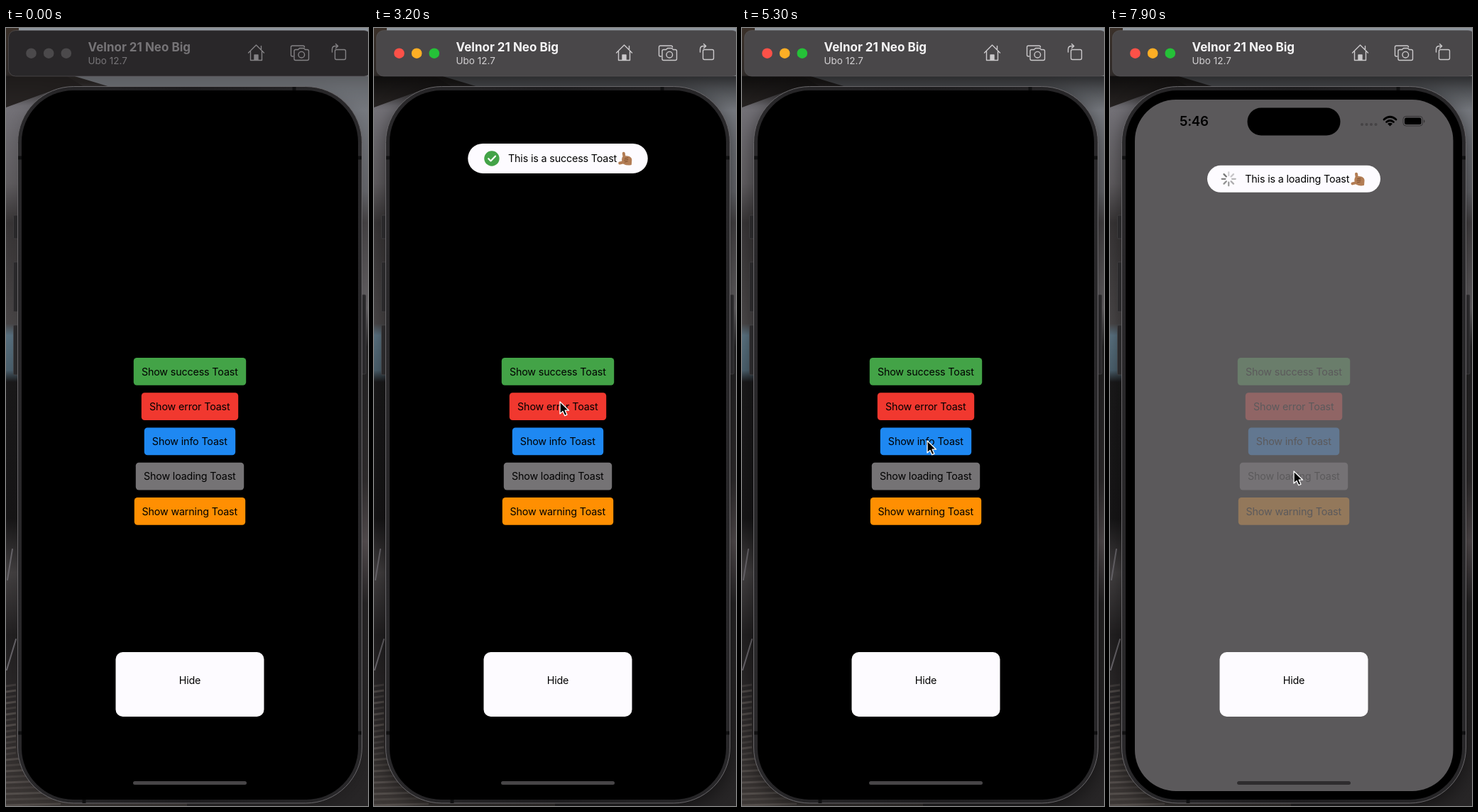
Recreate the animation shown at these times as an HTML page. Size 510 by 1097 pixels, loop 8 s.

```html
<!DOCTYPE html>
<html lang="en">
<head>
<meta charset="utf-8">
<title>Toast demo</title>
<style>
  html, body { margin: 0; width: 100%; height: 100%; overflow: hidden; background: #000; }
  svg { display: block; width: 510px; height: 1097px; }
  text { font-family: Inter, "Liberation Sans", sans-serif; }
  .label { font-size: 14.3px; letter-spacing: -.15px; }
  .mid { text-anchor: middle; }
  .line { fill: none; stroke-linecap: round; stroke-linejoin: round; }
</style>
</head>
<body>
<svg viewBox="0 0 510 1097">
  <defs>
    <linearGradient id="leftTone" x2="0" y2="1">
      <stop offset="0" stop-color="#3a3029"/><stop offset=".07" stop-color="#2e2a29"/>
      <stop offset=".1" stop-color="#747278"/><stop offset=".2" stop-color="#625f62"/>
      <stop offset=".25" stop-color="#3a3738"/><stop offset=".38" stop-color="#4b4849"/>
      <stop offset=".395" stop-color="#5b7382"/><stop offset=".44" stop-color="#4d626f"/>
      <stop offset=".455" stop-color="#1b1a1b"/><stop offset=".63" stop-color="#171617"/>
      <stop offset=".7" stop-color="#454243"/><stop offset=".78" stop-color="#232122"/>
      <stop offset=".86" stop-color="#2c292a"/><stop offset="1" stop-color="#3d3836"/>
    </linearGradient>
    <linearGradient id="rightTone" x2="0" y2="1">
      <stop offset="0" stop-color="#9299a1"/><stop offset=".1" stop-color="#777a80"/>
      <stop offset=".21" stop-color="#68696e"/><stop offset=".25" stop-color="#484547"/>
      <stop offset=".36" stop-color="#6a676a"/><stop offset=".41" stop-color="#242324"/>
      <stop offset=".58" stop-color="#302d2e"/><stop offset=".66" stop-color="#564f51"/>
      <stop offset=".74" stop-color="#272526"/><stop offset="1" stop-color="#282627"/>
    </linearGradient>
    <linearGradient id="shade" x2="0" y2="1">
      <stop offset="0" stop-opacity=".65"/><stop offset="1" stop-opacity="0"/>
    </linearGradient>
    <linearGradient id="rim" x2="1">
      <stop offset="0" stop-color="#29282a"/><stop offset=".5" stop-color="#1d1c1e"/><stop offset="1" stop-color="#29282a"/>
    </linearGradient>
    <filter id="soft"><feGaussianBlur stdDeviation="14"/></filter>
    <clipPath id="glass"><rect x="22" y="88" width="474" height="1000" rx="73"/></clipPath>
    <g id="hand">
      <path class="line" stroke="#b37d55" stroke-width="4" d="M9 9L8 2.800M9 15L2.500 16.500"/>
      <path fill="#b37d55" d="M6 8Q10 5 16 7Q20 9 19.500 13L19 19Q13 20.500 8 18Q4 14 6 8Z"/>
      <path class="line" stroke="#80502f" stroke-width="1" d="M9.500 10L14 9M9 12.500L14 11.500M9.500 15L13.500 14"/>
    </g>
  </defs>

  <rect width="255" height="1097" fill="url(#leftTone)"/>
  <rect x="255" width="255" height="1097" fill="url(#rightTone)"/>
  <path fill="#8e959d" d="M18 0H510V6H18Z"/>
  <path fill="#7e8187" d="M90 66H510V84H150Z"/>
  <path fill="#292524" d="M0 66H82L112 84L60 90L0 112Z"/>
  <path class="line" stroke="#6b686d" stroke-width="2" d="M2 778L9 735M1 905L14 862"/>
  <g id="grate" stroke="#5c5653" stroke-width="3"></g>
  <g id="shadow">
    <rect x="16" y="90" width="486" height="1010" rx="79" filter="url(#soft)" opacity=".5"/>
    <rect y="68" width="510" height="48" fill="url(#shade)"/>
  </g>

  <g fill="#29282a" stroke="#454446" stroke-width=".7">
    <rect x="10.500" y="264" width="7" height="33" rx="1.500"/>
    <rect x="10.500" y="330" width="7" height="70" rx="1.500"/>
    <rect x="10.500" y="419" width="7" height="70" rx="1.500"/>
    <rect x="500" y="376" width="7" height="112" rx="1.500"/>
  </g>
  <rect x="16.500" y="82.500" width="485" height="1010.500" rx="79" fill="url(#rim)" stroke="#69676a"/>
  <path stroke="#101011" stroke-width="5" d="M17 183h5M496 183h5M17 994h5M496 994h5M406 83v5M110 1088v5"/>
  <rect x="22" y="88" width="474" height="1000" rx="73"/>

  <g id="buttons"></g>
  <rect x="179" y="1062" width="160" height="5" rx="2.500" fill="#474547"/>

  <g id="overlay" opacity="0">
    <rect x="35" y="101" width="448.500" height="975" rx="58" fill="#757375" fill-opacity=".78"/>
    <rect x="193.500" y="112.500" width="131" height="39" rx="19.500"/>
    <text x="98" y="138" font-size="18.700" font-weight="600" letter-spacing="-.3">5:46</text>
    <g fill="#454345">
      <circle cx="355" cy="136" r="2"/><circle cx="361.500" cy="136" r="2"/>
      <circle cx="368" cy="136" r="2"/><circle cx="374.500" cy="136" r="2"/>
    </g>
    <path class="line" stroke="#000" stroke-width="2.800" d="M386 129Q394.500 121.500 403 129M389.500 132.500Q394.500 128.500 399.500 132.500"/>
    <path d="M391 135Q394.500 132.500 398 135L394.500 138.500Z"/>
    <rect x="413" y="124.500" width="27.500" height="13.500" rx="4" fill="none" stroke="#343234"/>
    <rect x="415" y="126.500" width="23.500" height="9.500" rx="2.500"/>
    <path fill="#343234" d="M442 129Q445 131.300 442 134Z"/>
    <rect x="179" y="1062" width="160" height="5" rx="2.500" fill="#2e2c2e"/>
  </g>

  <rect x="154.500" y="880" width="209" height="91" rx="10" fill="#fdfbff"/>
  <text class="label mid" x="259" y="925">Hide</text>
  <g id="toasts" clip-path="url(#glass)"></g>

  <rect id="bar" x="3.500" y="3.500" width="511" height="64.500" rx="10" stroke="#5b595b" stroke-opacity=".6"/>
  <g id="lights"><circle cx="35.500" cy="35.700" r="7.300"/><circle cx="60.200" cy="35.700" r="7.300"/><circle cx="84.800" cy="35.700" r="7.300"/></g>
  <text id="device" x="115.500" y="33.300" font-size="17" font-weight="700">Velnor 21 Neo Big</text>
  <text id="system" x="115.500" y="50.500" font-size="13.500">Ubo 12.7</text>
  <g id="icons" class="line" stroke-width="1.400">
    <path d="M341.500 35L352.500 24L363.500 35M344.500 33V45.500H360.500V33M359.500 30V25.500"/>
    <path d="M350 45V38H355V45Z" fill="currentColor"/>
    <path d="M404.500 40H403.500Q401.500 40 401.500 38V27Q401.500 25 403.500 25H418.500Q420.500 25 420.500 27"/>
    <path d="M408 30.500H411.500L413.500 28.500H419.500L421.500 30.500H424.500Q426.500 30.500 426.500 32.500V43.500Q426.500 45.500 424.500 45.500H408Q406 45.500 406 43.500V32.500Q406 30.500 408 30.500Z"/>
    <circle cx="416.300" cy="37.700" r="4.300"/>
    <rect x="463.500" y="30.500" width="15" height="14" rx="2"/>
    <path d="M459.500 34V30Q459.500 25.500 464 25.500H467.500M464.500 22.500L467.700 25.500L464.500 28.500"/>
  </g>
  <path id="cursor" d="M0 0V17L4 13.400L6.800 19.700L9.900 18.300L7.200 12.200H12.500Z" fill="#000" stroke="#fff" stroke-width="1.300" stroke-linejoin="round"/>
</svg>
<script>
const $ = id => document.getElementById(id);
const LOOP = 8000, STEP = 100, ACTIVE_AT = 1300;

const buttons = [
  ['success', 158, '#43a347'], ['error', 136, '#f1382f'], ['info', 128, '#1e88f2'],
  ['loading', 152, '#757375'], ['warning', 156, '#ff8f02']
];
$('buttons').innerHTML = buttons.map(([name, w, color], i) => {
  const y = 465 + i * 49.25;
  return `<rect x="${258.8 - w / 2}" y="${y}" width="${w + .4}" height="38.700" rx="4.500" fill="${color}"/>
    <text class="label mid" x="258.800" y="${y + 24.6}">Show ${name} Toast</text>`;
}).join('');

$('grate').innerHTML = Array.from({ length: 22 }, (_, i) =>
  `<path d="M0 ${928 + i * 8}L${14 + Math.max(0, i - 12) * 7} ${926 + i * 8}" opacity="${.45 + .3 * (i % 2)}"/>`).join('');

const disc = color => `<circle r="10.700" fill="${color}"/>`;
const spokes = Array.from({ length: 8 }, (_, i) =>
  `<path class="spoke" d="M0 -4.800V-9.500" stroke="#777" stroke-width="2.300" stroke-linecap="round" transform="rotate(${i * 45})"/>`).join('');

const toasts = [
  { start: 1750, end: 3077, w: 253.5, h: 42, text: 'a success',
    icon: disc('#43a347') + '<path class="line" stroke="#fff" stroke-width="2.200" d="M-4.700 .300L-1.500 3.500L5 -3.300"/>' },
  { start: 3870, end: 4950, w: 240, h: 42, text: 'an error',
    icon: disc('#f1382f') + '<path class="line" stroke="#fff" stroke-width="2.200" d="M0 -5V.800M0 4.800V5"/>' },
  { start: 5700, end: 6920, w: 233, h: 42, text: 'an info',
    icon: disc('#1e88f2') + '<path class="line" stroke="#fff" stroke-width="2.200" d="M0 -5V-4.800M0 -.800V5"/>' },
  { start: 7500, end: 9000, w: 244, h: 38, text: 'a loading', icon: spokes }
];
$('toasts').innerHTML = toasts.map(({ w, h, text, icon }) => {
  const x = 259 - w / 2, pad = h === 38 ? 3.5 : 0;
  return `<g><rect x="${x}" y="${-h / 2}" width="${w}" height="${h}" rx="${h / 2}" fill="#fdfbff"/>
    <g transform="translate(${x + 33.7 - pad} 0)">${icon}</g>
    <text class="label" x="${x + 56.7 - pad}" y="5">This is ${text} Toast</text>
    <use href="#hand" x="${x + w - 42}" y="-10"/></g>`;
}).join('');
const toastNodes = [...$('toasts').children];
const spokeNodes = [...document.querySelectorAll('.spoke')];

const clamp = v => Math.max(0, Math.min(1, v));
const smooth = p => p * p * (3 - 2 * p);

// Rows are [time, ...values]; values are eased between rows.
function sample(rows, t) {
  const i = rows.findIndex(r => r[0] > t);
  if (i < 0) return rows[rows.length - 1].slice(1);
  if (!i) return rows[0].slice(1);
  const a = rows[i - 1], b = rows[i], p = smooth((t - a[0]) / (b[0] - a[0]));
  return a.slice(1).map((v, k) => v + (b[k + 1] - v) * p);
}

const pointer = [
  [700, 515, 800], [1250, 261, 480], [2450, 261, 480], [2900, 262, 527],
  [4600, 262, 527], [5100, 261, 582], [6500, 261, 582], [7100, 259, 625]
];
const enter = [[0, 60], [330, 216], [480, 209]];

function toastY({ start, end }, t) {
  if (t < end) return sample(enter, t - start)[0];
  return 209 - 149 * ((t - end) / 300) ** 2;
}

function paintWindow(active) {
  const fill = (id, color) => $(id).setAttribute('fill', color);
  fill('bar', active ? '#494749' : '#292729');
  fill('device', active ? '#f5f4f5' : '#767477');
  fill('system', active ? '#d2d0d2' : '#767477');
  const ink = active ? '#cbc9cb' : '#848285';
  $('icons').setAttribute('stroke', ink);
  $('icons').setAttribute('color', ink);
  const colors = active ? ['#fc5148', '#fdae25', '#25c138'] : Array(3).fill('#4b494b');
  [...$('lights').children].forEach((c, i) => c.setAttribute('fill', colors[i]));
  $('shadow').setAttribute('opacity', active ? 1 : .4);
}

function draw(t) {
  paintWindow(t >= ACTIVE_AT);
  const [x, y] = sample(pointer, t);
  $('cursor').setAttribute('transform', `translate(${x} ${y})`);
  $('overlay').setAttribute('opacity', clamp((t - 7500) / 300));
  toasts.forEach((toast, i) => {
    const shown = t >= toast.start && t < toast.end + 300;
    toastNodes[i].setAttribute('visibility', shown ? 'visible' : 'hidden');
    if (shown) toastNodes[i].setAttribute('transform', `translate(0 ${toastY(toast, t)})`);
  });
  const head = Math.floor(t / 100) % 8;
  spokeNodes.forEach((s, i) => s.setAttribute('opacity', 1 - ((head - i + 8) % 8) * .1));
}

function tick() {
  draw(Math.floor(performance.now() % LOOP / STEP) * STEP);
  requestAnimationFrame(tick);
}
tick();
</script>
</body>
</html>
```
